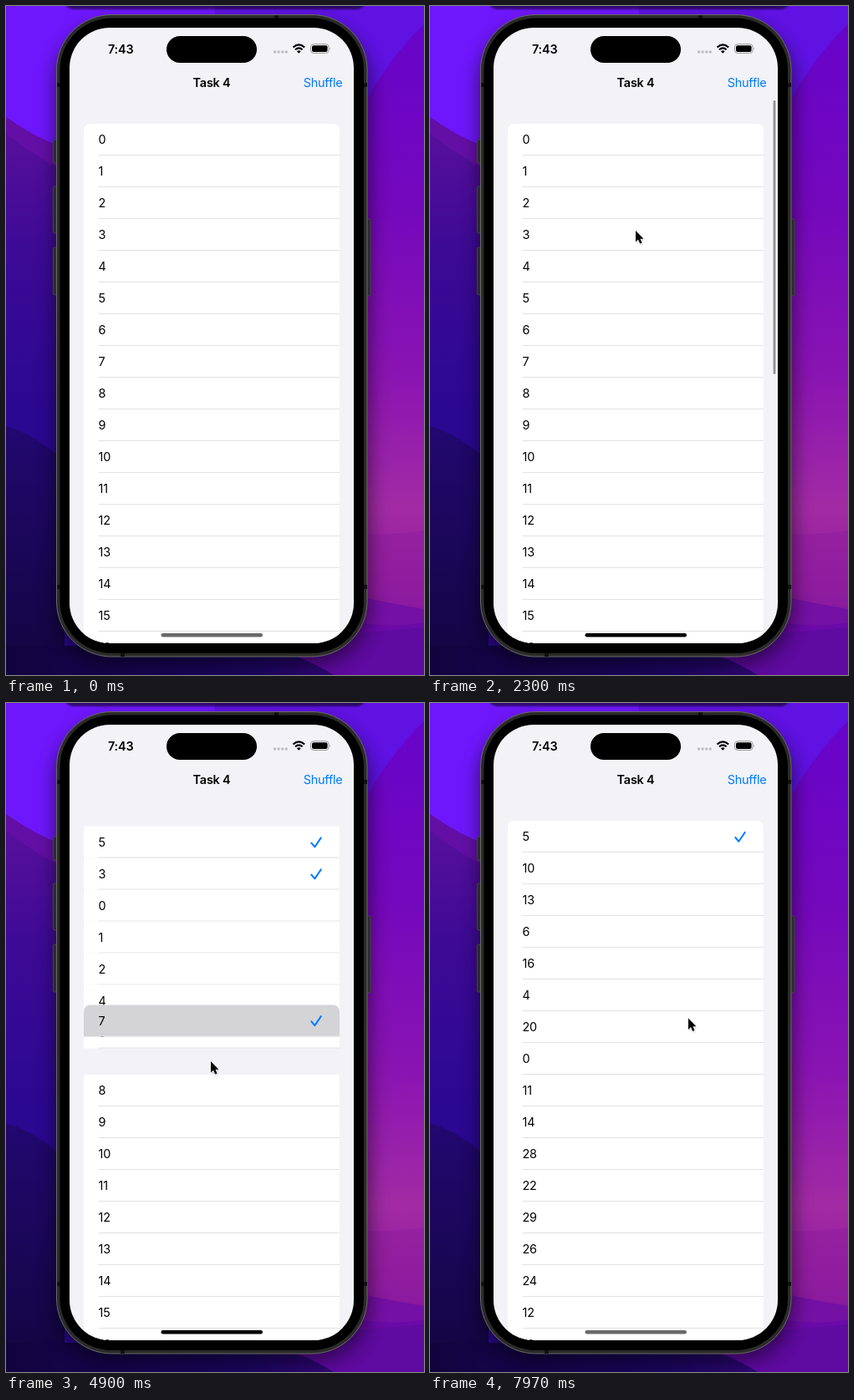
Recreate the animation shown at these times as an HTML page. Size 500 by 801 pixels, loop 8 s.

```html
<!DOCTYPE html>
<html lang="en">
<head>
<meta charset="utf-8">
<title>Shuffle list</title>
<style>
html, body { margin: 0; width: 100%; height: 100%; overflow: hidden; background: #1c0760; }
svg { display: block; width: 500px; height: 801px; }
text { font: 14.4px Inter, "Open Sans", sans-serif; letter-spacing: -.2px; }
.bold { font-weight: 600; }
</style>
</head>
<body>
<svg viewBox="0 0 500 801">
  <defs>
    <linearGradient id="left" x2="0" y2="1">
      <stop offset=".2" stop-color="#560f9c"/><stop offset=".36" stop-color="#3d0a95"/>
      <stop offset=".6" stop-color="#2b0890"/>
    </linearGradient>
    <linearGradient id="deep" x2="0" y2="1">
      <stop stop-color="#220870"/><stop offset="1" stop-color="#12053f"/>
    </linearGradient>
    <linearGradient id="right" x2="0" y2="1">
      <stop stop-color="#6604cc"/><stop offset=".3" stop-color="#7408bc"/>
      <stop offset=".55" stop-color="#8a14b2"/><stop offset=".75" stop-color="#a22ba4"/>
      <stop offset=".85" stop-color="#94209f"/><stop offset="1" stop-color="#6a0aa6"/>
    </linearGradient>
    <linearGradient id="base">
      <stop stop-color="#10043e"/><stop offset=".6" stop-color="#1c0562"/><stop offset="1" stop-color="#4a0892"/>
    </linearGradient>
    <filter id="blur" x="-20%" y="-20%" width="140%" height="140%"><feGaussianBlur stdDeviation="11"/></filter>
    <filter id="soft" x="-50%" y="-50%" width="200%" height="200%"><feGaussianBlur stdDeviation="1"/></filter>
    <clipPath id="screen"><rect x="76" y="26" width="340" height="737" rx="48"/></clipPath>
  </defs>

  <rect width="250" height="801" fill="url(#left)"/>
  <path d="M0 0H250V240Q80 190 0 133Z" fill="#6f17fc"/>
  <path d="M0 133Q35 158 70 170V198Q35 180 0 153Z" fill="#630fa6"/>
  <path d="M0 503Q35 513 70 545V801H0Z" fill="url(#deep)"/>
  <rect x="250" width="250" height="801" fill="url(#right)"/>
  <path d="M250 0H500V22Q455 65 425 125H250Z" fill="#5f12e2"/>
  <path d="M420 632Q460 634 500 628V720Q460 715 420 706Z" fill="#8f1d9f" opacity=".55"/>
  <path d="M420 706Q460 716 500 722V801H420Z" fill="#7410a4"/>
  <path d="M420 738Q465 745 500 738V801H420Z" fill="#6a0aa8"/>
  <path d="M0 766H500V801H0Z" fill="url(#base)"/>
  <path d="M305 766Q350 775 392 801H500V744L430 750Z" fill="#5f0aa0"/>
  <rect x="58" y="22" width="378" height="768" rx="70" opacity=".48" filter="url(#blur)"/>
  <rect x="70" y="-20" width="360" height="24" rx="10" opacity=".55" filter="url(#soft)"/>

  <g fill="#2c2c2b" stroke="#4b4b49" stroke-width=".8">
    <rect x="56.4" y="160" width="6" height="28" rx="1.5"/>
    <rect x="56.4" y="216" width="6" height="56" rx="1.5"/>
    <rect x="56.4" y="289" width="6" height="57" rx="1.5"/>
    <rect x="430" y="255" width="6" height="92" rx="1.5"/>
  </g>
  <rect x="60.5" y="10.5" width="371.5" height="768.5" rx="66" fill="#2b2b2a" stroke="#6a6a66"/>
  <g fill="#111">
    <path d="M61 92h4v5h-4zM428 92h4v5h-4zM61 693h4v5h-4zM428 693h4v5h-4zM321 11h5v4h-5zM137 775h5v4h-5z"/>
  </g>
  <rect x="64.5" y="14.5" width="363.500" height="760.500" rx="62"/>

  <g clip-path="url(#screen)">
    <rect x="76" y="26" width="340" height="737" fill="#f2f2f7"/>
    <g id="list"></g>
    <rect id="bar" x="410.600" y="113" width="2.800" rx="1.400" fill="#919196"/>
    <rect id="home" x="185.500" y="751" width="121.500" height="4.600" rx="2.300"/>
  </g>

  <rect x="192" y="36" width="108" height="32" rx="16"/>
  <text class="bold" x="122" y="56.500">7:43</text>
  <text class="bold" x="246" y="96.500" text-anchor="middle">Task 4</text>
  <text id="shuffle" x="402.500" y="96.500" text-anchor="end" fill="#007aff">Shuffle</text>
  <g fill="#bdbdc1">
    <circle cx="321.500" cy="55" r="1.700"/><circle cx="326" cy="55" r="1.700"/>
    <circle cx="330.600" cy="55" r="1.700"/><circle cx="335.200" cy="55" r="1.700"/>
  </g>
  <g fill="none" stroke="#000" stroke-width="2.200">
    <path d="M343.500 49.500Q350.300 43.300 357.100 49.500M346 52.300Q350.300 48.500 354.600 52.300"/>
  </g>
  <path d="M347.900 54.200Q350.300 52.200 352.700 54.200L350.300 56.800Z"/>
  <rect x="364.500" y="45.700" width="21.500" height="10.800" rx="3.300" fill="none" stroke="#9a9a9e"/>
  <rect x="366" y="47.200" width="18.500" height="7.800" rx="2"/>
  <path d="M387.200 49.300q1.400 1.800 0 3.600z" fill="#9a9a9e"/>

  <g id="cursor">
    <path d="M0 0V13.400L3 10.600 5.200 15.600 7.600 14.500 5.400 9.700H9.500Z" transform="translate(.5 1.500)" opacity=".3" filter="url(#soft)"/>
    <path d="M0 0V13.400L3 10.600 5.200 15.600 7.600 14.500 5.400 9.700H9.500Z" stroke="#fff" stroke-width="1.300" paint-order="stroke"/>
  </g>
</svg>
<script>
const LOOP = 8000, ROW = 38, TOP = 141, COUNT = 30;
const SQUARE = 'M0 0H306V38H0Z';
const ROUNDED = 'M0 38V8.500Q0 0 8.500 0H297.500Q306 0 306 8.500V38Z';
const $ = id => document.getElementById(id);
const list = $('list'), bar = $('bar'), home = $('home'), shuffle = $('shuffle'), cursor = $('cursor');

const toFront = (order, v) => [v, ...order.filter(n => n !== v)];
const start = Array.from({ length: COUNT }, (_, i) => i);
const shuffled = [5, 10, 13, 6, 16, 4, 20, 0, 11, 14, 28, 22, 29, 26, 24, 12,
  19, 3, 25, 8, 17, 1, 23, 7, 27, 15, 2, 21, 9, 18];

// Each step starts at a time and leads to a new order; a tapped row is checked.
const steps = [{ at: -1000, order: start }];
for (const [at, tapped] of [[2590, 3], [3590, 5], [4822, 7]])
  steps.push({ at, tapped, order: toFront(steps.at(-1).order, tapped) });
steps.push({ at: 6320, order: shuffled });

const path = [[670, 505, 440], [1000, 312, 480], [1330, 316, 587], [1480, 316, 592],
  [2200, 246, 269], [2950, 246, 269], [3430, 241.5, 366], [3950, 241.5, 366],
  [4270, 243, 421], [4430, 245, 429], [5250, 245, 429], [6050, 384, 96],
  [7430, 384, 96], [7950, 309, 377.5]];
const pull = [[1000, 0], [1330, 54], [1480, 57]];
const barAlpha = [[1010, 0], [1100, 1], [3700, 1], [4000, 0]];
const homeShade = [[670, 105], [900, 0], [2900, 0], [3200, 105], [4300, 105], [4600, 0], [5700, 0], [6000, 105]];
const buttonAlpha = [[6120, 1], [6140, .2], [6310, .2], [6700, 1]];

const smooth = x => { x = Math.min(1, Math.max(0, x)); return x * x * (3 - 2 * x); };
const mix = (a, b, k) => a + (b - a) * k;

function track(keys, t, field = 1) {
  const next = keys.findIndex(k => k[0] > t);
  if (next < 0) return keys.at(-1)[field];
  if (!next) return keys[0][field];
  const a = keys[next - 1], b = keys[next];
  return mix(a[field], b[field], smooth((t - a[0]) / (b[0] - a[0])));
}

function pullOffset(t) {
  if (t < 1480) return track(pull, t);
  const s = (t - 1480) / 85;
  return 57 * (1 + s) * Math.exp(-s);
}

const rows = start.map(n => {
  const el = document.createElementNS('http://www.w3.org/2000/svg', 'g');
  el.innerHTML = `<path/><path d="M17.500 37.500H306" stroke="#e2e2e5"/><text x="17.500" y="24.200">${n}</text>
    <path d="M272.300 20L276.300 24.800 283.800 13.800" fill="none" stroke="#007aff" stroke-width="2" stroke-linecap="round" stroke-linejoin="round"/>`;
  const [face, , , check] = el.children;
  return { n, el, face, check };
});

let shown = -1;
function enter(index) {
  shown = index;
  const { order, tapped } = steps[index];
  const checked = steps.slice(0, index + 1).map(s => s.tapped);
  for (const { n, el, face, check } of rows) {
    list.append(el);
    face.setAttribute('d', order[0] === n ? ROUNDED : SQUARE);
    face.setAttribute('fill', '#fff');
    check.style.display = checked.includes(n) ? '' : 'none';
  }
  if (tapped !== undefined) list.append(rows[tapped].el);
}

function draw(t) {
  const index = steps.findLastIndex(s => t >= s.at);
  if (index !== shown) enter(index);
  const step = steps[index], before = steps[Math.max(0, index - 1)].order;
  const k = smooth((t - step.at) / 300), offset = pullOffset(t);

  for (const { n, el } of rows) {
    const place = mix(before.indexOf(n), step.order.indexOf(n), k);
    el.setAttribute('transform', `translate(93 ${TOP + offset + place * ROW})`);
  }
  if (step.tapped !== undefined) {
    const fade = smooth((t - step.at) / 500), c = mix(209, 255, fade);
    rows[step.tapped].face.setAttribute('fill', `rgb(${c},${c},${mix(212, 255, fade)})`);
  }

  bar.setAttribute('height', 328 - offset);
  bar.setAttribute('opacity', track(barAlpha, t));
  const shade = track(homeShade, t);
  home.setAttribute('fill', `rgb(${shade},${shade},${shade})`);
  shuffle.setAttribute('opacity', track(buttonAlpha, t));
  cursor.style.display = t < path[0][0] ? 'none' : '';
  cursor.setAttribute('transform', `translate(${track(path, t)} ${track(path, t, 2)})`);
}

function tick() {
  draw(performance.now() % LOOP);
  requestAnimationFrame(tick);
}
tick();
</script>
</body>
</html>
```
